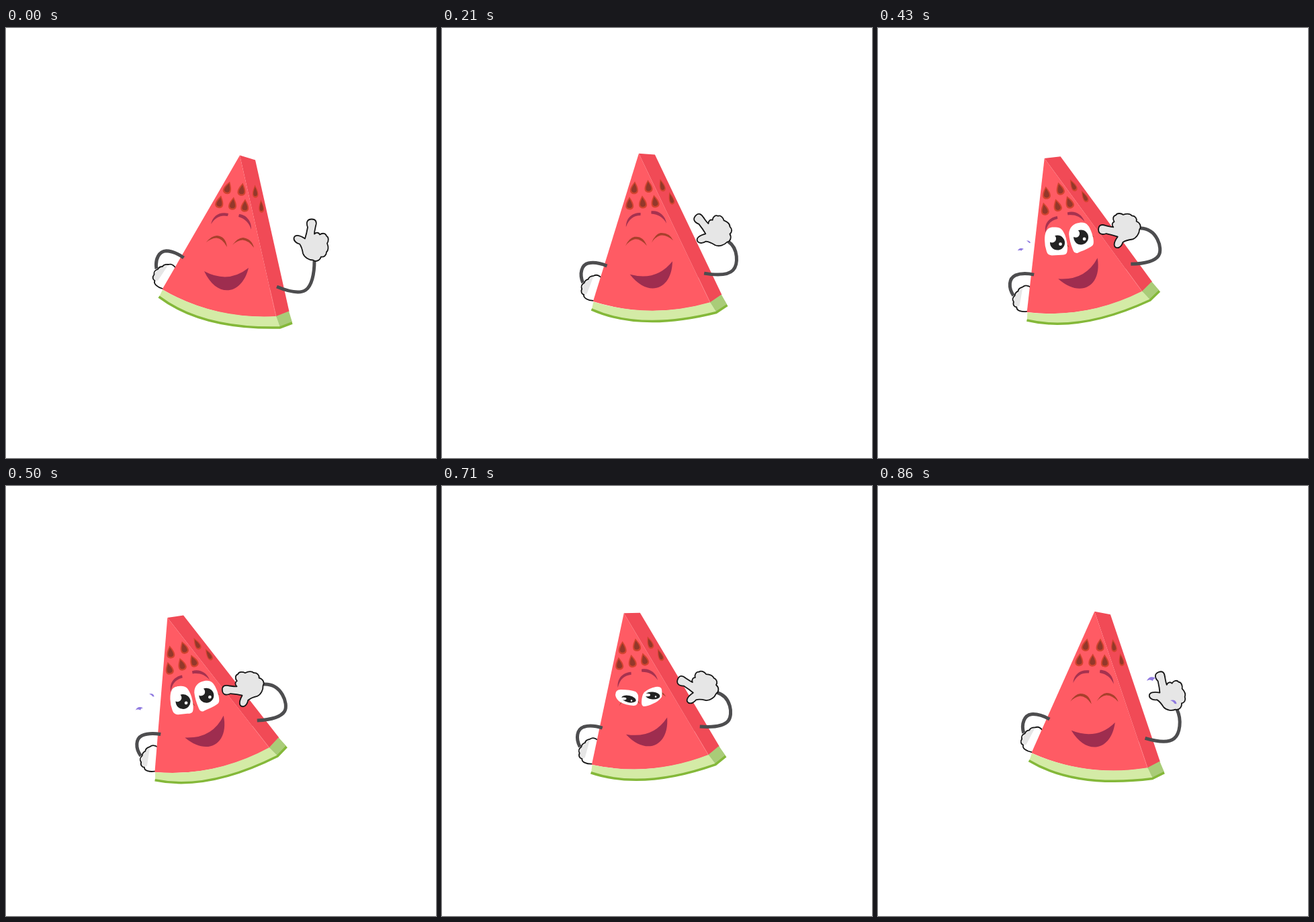
An HTML page for the animation above (930 ms loop, 640 by 640 pixels).

```html
<!DOCTYPE html>
<html lang="en">
<head>
<meta charset="utf-8">
<title>Melon slice</title>
<style>
  html, body { margin: 0; width: 100%; height: 100%; overflow: hidden; background: #fff; }
  svg { display: block; width: 100vw; height: 100vh; }
  .arm { fill: none; stroke: #4d4d4f; stroke-width: 5; }
  .line { stroke: #161616; stroke-width: 1.8; stroke-linejoin: round; stroke-linecap: round; }
</style>
</head>
<body>
<svg viewBox="0 0 640 640">
  <g id="slice">
    <!-- resting hand -->
    <path fill="#fff" d="M226 358 Q228 354 233 354 Q235 350 242 351 Q248 349 253 356 L262 370 L240 392 L233 387 Q222 382 221 375 Q217 372 220 366 Z"/>
    <path fill="#e6e6e6" d="M226 358 Q228 354 233 354 Q235 350 242 351 L226 375 L221 374 Q218 370 220 366 Z"/>
    <path class="line" fill="none" d="M253 357 Q248 349 242 351 Q235 350 233 354 Q228 354 226 358 C220 360 220 363 220.500 366 C217 370 219 374 221.500 375 C219 380 226 385 233 387"/>

    <!-- slice -->
    <path fill="#f14a56" d="M348 188.500 L371 195.500 L421.500 421 L402 429 Z"/>
    <path fill="#ff5b64" d="M348 188.500 L402 428.500 Q310 433.500 232.500 388 Z"/>
    <path fill="none" stroke="#ff8d92" stroke-width=".6" d="M393 388 L402 428"/>
    <path fill="#d4eba6" d="M233 388.500 Q310 433 402 428 L408 445 C315 447 262 425 228 399 Z"/>
    <path fill="#a9cc78" d="M402 428 L421 420.500 L426 437 L408 445 Z"/>
    <path fill="none" stroke="#84b839" stroke-width="3.500" stroke-linejoin="round" d="M227.500 399 C262 425 315 447 407.500 445 L426 438"/>
    <g id="seeds"></g>

    <!-- face -->
    <path fill="#a6324f" d="M305 291 C308 278 318 272 331 275 L330 279 C320 277 312 280 305 291 Z M347 276 C358 277 366 287 365 299 C362 289 356 283 346 280 Z"/>
    <path fill="#a8402c" d="M298 318 Q306 308 314 308 Q327 309 329 325 Q322 312 313 311.500 Q305 312 298 318 Z M337 322 Q345 311 353 311 Q366 313 369 326 Q361 315 352 314.500 Q344 315 337 322 Z"/>
    <path fill="#9e2d4f" d="M295 361 Q331 380 361 356 C351 397 314 402 295 361 Z"/>

    <g id="wide" transform="rotate(24.100 308.500 431) translate(0 -1)">
      <path fill="#fff" d="M247 316 C247 304 250 297 260 297 C270 296 273 299 277 308 C281 318 282 330 280 335 Q279 338 272 338 L258 339 Q252 339 250 333 Q247 325 247 316 Z M283 307 C283 297 290 291 298 290 C309 288 313 294 317 305 C320 314 321 321 318 324 C312 329 302 332 296 335 Q291 336 289 330 Q284 318 283 307 Z"/>
      <g fill="#222"><circle cx="266" cy="320" r="11"/><circle cx="301" cy="311.500" r="11"/></g>
      <g fill="#fff">
        <circle cx="258" cy="314" r="6"/><circle cx="270.500" cy="322" r="2.400"/>
        <circle cx="293" cy="306" r="6"/><circle cx="306" cy="314" r="2.400"/>
      </g>
    </g>
    <g id="half" transform="rotate(18.100 308.500 431) translate(0 -1)">
      <path fill="#fff" d="M258 311 Q258 303 266 303 Q280 303 288 306 Q293 309 292 318 Q292 327 285 327 Q273 326 266 322 Q259 318 258 311 Z M297 322 Q297 312 301 307 Q308 301 318 299 Q326 298 327 303 Q328 309 327 314 Q322 321 314 324 Q306 328 300 328 Q297 327 297 322 Z"/>
      <g fill="#222">
        <ellipse cx="278" cy="317" rx="11" ry="5" transform="rotate(12 278 317)"/>
        <ellipse cx="313.500" cy="312" rx="11" ry="5.500" transform="rotate(5 313 312)"/>
      </g>
      <g fill="#fff">
        <ellipse cx="270" cy="316.500" rx="4.500" ry="2"/><circle cx="282" cy="319.500" r="1.300"/>
        <ellipse cx="305.500" cy="311" rx="4.500" ry="2.200"/><circle cx="318" cy="313.500" r="1.300"/>
      </g>
    </g>

    <!-- arms -->
    <path class="arm" d="M264.500 341 C256 335 247 331 238.500 330.800 C228 331 221.500 343 224 357.500"/>
    <path class="arm" id="arm"/>
    <path class="line" id="hand" fill="#e6e6e6" d="M449 296 C446 288 449 284 455 284 C461 284 463 288 461 294 C460 299 459 302 459 306 C462 303 466 304 467 307 C471 304 476 305 477 309 C481 311 480 317 478 320 C480 325 480 330 477 333 C477 338 473 341 469 340 C467 346 461 348 457 345 C451 345 444 341 442 335 C441 329 440 325 437 321 C433 320 428 317 428.500 312 C430 306.500 437 307.500 445 313 C447 307 448 302 449 296 Z"/>
  </g>
  <g id="drops" fill="#8f7ae0">
    <path id="dropA" d="M-7 4 Q-3 -5 7 0 Q3 0 2 4 Q-3 1 -7 4 Z"/>
    <path id="dropB" d="M-5 -2 Q3 -4 4.500 3 Q1 4 0 1 Q-2 -1 -5 -2 Z"/>
  </g>
</svg>
<script>
const el = id => document.getElementById(id);
const LOOP = 930, STEPS = 13;
const CUTS = [70, 140, 210, 290, 360, 430, 500, 570, 640, 710, 790, 860];

// x, y, lean, width
const SEEDS = [
  [330, 237, 18, 1], [351, 239.5, 8, 1], [371, 242.5, -3, .72],
  [318, 258, 12, 1], [337.5, 260.5, 8, 1], [355.5, 263.5, 3, 1], [380, 264.5, -4, .65]
];
el('seeds').innerHTML = SEEDS.map(([x, y, lean, w]) =>
  `<g transform="translate(${x} ${y}) rotate(${lean}) scale(${w} 1)">
    <path fill="#d24430" d="M0 -10 C3 -5 6 -1 6 4 C6 11 -6 11 -6 4 C-6 -1 -3 -5 0 -10Z"/>
    <path fill="#93382a" d="M0 -7 C2 -3 4 0 4 3.500 C4 8 -4 8 -4 3.500 C-4 0 -2 -3 0 -7Z"/>
  </g>`).join('');

// Swing out with a soft landing, then back at an even pace
const tilt = n => n <= 8
  ? -26 * Math.sin(Math.PI / 2 * Math.pow(n / 8, 1.13))
  : -6.03 * (STEPS - n);

const show = (node, on) => node.setAttribute('visibility', on ? 'visible' : 'hidden');
const place = (node, x, y, s) =>
  node.setAttribute('transform', `translate(${x} ${y}) scale(${s})`);

function drawArm(k) {
  const bow = k * (1 - k);
  const x = 459 - 22.5 * k + 7 * bow, y = 345.5 - 5 * k + 13 * bow;
  const cx = 459 + k + 6 * bow, cy = 365 - 14 * k + 8 * bow;
  el('arm').setAttribute('d',
    `M403 384 C420 391 437 395 446 389 C${455 + k} ${383 - k} ${cx} ${cy} ${x} ${y}`);
  el('hand').setAttribute('transform',
    `translate(${x} ${y}) rotate(${-65.4 * k}) translate(-459 -346)`);
}

function drawDrops(n) {
  const left = n >= 6 && n <= 8, right = n >= 11;
  show(el('drops'), left || right);
  if (left) {
    const d = n - 6, s = .65 + .15 * d;
    place(el('dropA'), 212.5 - 14 * d, 329 + 1.5 * d, s);
    place(el('dropB'), 224 - 7 * d, 318 - 7 * d, s);
  } else if (right) {
    const d = n - 11, s = .6 + .4 * d;
    place(el('dropA'), 379 + 28 * d, 295 - 9 * d, s);
    place(el('dropB'), 395 + 45 * d, 314 + 7 * d, s);
  }
}

function draw(ms) {
  const t = ms % LOOP;
  const n = CUTS.filter(c => c <= t).length;
  const a = tilt(n);
  el('slice').setAttribute('transform', `translate(0 1) rotate(${a} 308.5 431)`);
  drawArm(-a / 24);
  drawDrops(n);
  show(el('wide'), n >= 6 && n <= 9);
  show(el('half'), n === 5 || n === 10);
}

function tick() {
  draw(performance.now());
  requestAnimationFrame(tick);
}
tick();
</script>
</body>
</html>
```
